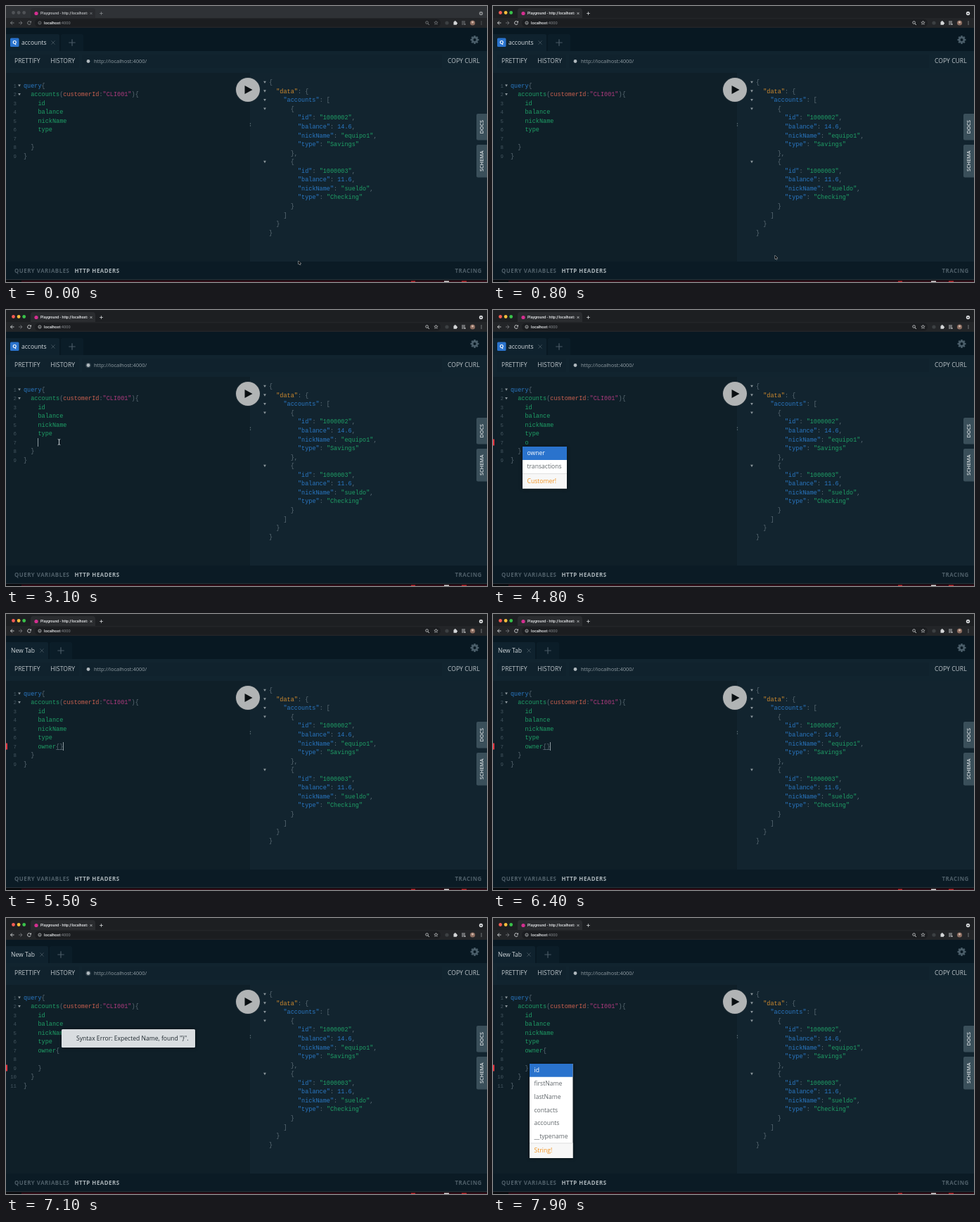
An HTML page with a canvas that plays this animation: 684x392 px, repeating every 8 s.

```html
<!DOCTYPE html>
<html lang="en">
<head>
<meta charset="utf-8">
<title>Query editor</title>
<style>
html, body { margin: 0; width: 100%; height: 100%; overflow: hidden; background: #0b1924; }
canvas { display: block; }
</style>
</head>
<body>
<canvas id="stage" width="684" height="392"></canvas>
<script>
const ctx = document.getElementById('stage').getContext('2d');
const LOOP = 8000;
const UI = '"Open Sans", sans-serif';
const CHROME = 'Roboto, sans-serif';
const MONO = '"Liberation Mono", monospace';
const CODE_SIZE = 8.53, CHAR = CODE_SIZE * 0.6, LINE = 12.5;
const COLOR = {
  key: '#2a78c4', field: '#1f9f66', arg: '#c9604f', str: '#ad3a7d',
  root: '#cb882e', punct: '#5c6c76', dim: '#4f5f69', light: '#bcc4c9',
  blue: '#2a73cd', orange: '#f29422', error: '#e8343f'
};

const T = {
  focus: 500, moveStart: 700, moveEnd: 1500, click: 2100,
  typeO: 4200, list: 4300, accept: 5000, brace: 5300, newTab: 5400, closeBrace: 5400,
  enter: 6600, tip: 6700, tipEnd: 7300, fields: 7500
};

function box(x, y, w, h, fill, radius = 0) {
  ctx.fillStyle = fill;
  ctx.beginPath();
  ctx.roundRect(x, y, w, h, radius);
  ctx.fill();
}

function dot(x, y, r, fill) {
  ctx.fillStyle = fill;
  ctx.beginPath();
  ctx.arc(x, y, r, 0, 7);
  ctx.fill();
}

function stroke(color, width, ...lines) {
  ctx.strokeStyle = color;
  ctx.lineWidth = width;
  ctx.beginPath();
  for (const [x, y, ...rest] of lines) {
    ctx.moveTo(x, y);
    for (let i = 0; i < rest.length; i += 2) ctx.lineTo(rest[i], rest[i + 1]);
  }
  ctx.stroke();
}

function ring(x, y, r, color, width = 0.8) {
  ctx.strokeStyle = color;
  ctx.lineWidth = width;
  ctx.beginPath();
  ctx.arc(x, y, r, 0, 7);
  ctx.stroke();
}

function poly(fill, ...pts) {
  ctx.fillStyle = fill;
  ctx.beginPath();
  for (let i = 0; i < pts.length; i += 2) ctx.lineTo(pts[i], pts[i + 1]);
  ctx.closePath();
  ctx.fill();
}

// y is the vertical middle of the capitals
function text(str, x, y, color, size = 8.6, { family = UI, weight = 400, align = 'left', spacing = 0 } = {}) {
  ctx.font = `${weight} ${size}px ${family}`;
  ctx.letterSpacing = spacing + 'px';
  ctx.textAlign = align;
  ctx.fillStyle = color;
  ctx.fillText(str, x, y + size * 0.34);
}

function cross(x, y, r, color, width = 0.8) {
  stroke(color, width, [x - r, y - r, x + r, y + r], [x - r, y + r, x + r, y - r]);
}

function plus(x, y, r, color, width = 0.9) {
  stroke(color, width, [x - r, y, x + r, y], [x, y - r, x, y + r]);
}

function code(parts, x, y) {
  for (const [str, color] of parts) {
    text(str, x, y, color, CODE_SIZE, { family: MONO });
    x += str.length * CHAR;
  }
}

function fold(x, y) {
  poly('#8b969c', x - 1.9, y - 1.5, x + 1.9, y - 1.5, x, y + 1.8);
}

function browser(active) {
  const icon = active ? '#d5d7d9' : '#85888b';
  const title = active ? '#e8eaec' : '#bcbfc2';
  box(0, 0, 684, 18, active ? '#1d1f22' : '#2f3236');
  box(35, 3, 92, 16, active ? '#2a2c2f' : '#292b2f', [4, 4, 0, 0]);
  box(0, 17, 684, 14, '#232528');
  box(41, 18.5, 577, 11, '#1b1d20', 5.5);
  const lights = active ? ['#f45b53', '#f5bd3c', '#39c34a'] : ['#505357', '#505357', '#505357'];
  lights.forEach((c, i) => dot(10.5 + i * 7.6, 9.5, 2.4, c));
  dot(43, 10.5, 2.6, '#d52f91');
  ctx.save();
  ctx.beginPath();
  ctx.rect(48, 4, 69, 12);
  ctx.clip();
  text('Playground - http://localhost:4000', 49, 10.5, title, 5.2, { family: CHROME, weight: 500 });
  ctx.restore();
  cross(121, 10.5, 1.5, icon, 0.7);
  plus(135.5, 10.5, 2.3, icon, 0.8);

  stroke(icon, 0.9, [11.5, 24, 6.5, 24], [9, 21.5, 6.5, 24, 9, 26.5]);
  stroke('#75787b', 0.9, [18, 24, 23, 24], [20.5, 21.5, 23, 24, 20.5, 26.5]);
  ctx.strokeStyle = icon;
  ctx.lineWidth = 0.9;
  ctx.beginPath();
  ctx.arc(33, 24, 2.4, 0.3, 5.5);
  ctx.stroke();
  poly(icon, 33.6, 23.4, 36, 23.4, 36, 21);
  ring(48, 24, 2.1, icon, 0.7);
  stroke(icon, 0.7, [48, 23.6, 48, 25.2]);
  text('localhost', 54, 24, '#e8eaec', 5.7, { family: CHROME, weight: 500 });
  text(':4000', 54 + ctx.measureText('localhost').width, 24, '#85898d', 5.7, { family: CHROME });

  ring(598.6, 23.5, 1.8, icon);
  stroke(icon, 0.9, [600, 25, 602, 27]);
  const star = [];
  for (let i = 0; i < 11; i++) {
    const r = i % 2 ? 1.2 : 2.8, a = i * Math.PI / 5 - Math.PI / 2;
    star.push(611.5 + r * Math.cos(a), 24 + r * Math.sin(a));
  }
  stroke(icon, 0.6, star);
  dot(627, 24, 2.6, '#3c4043');
  const puzzle = '#d5d7d9';
  box(636.5, 22.3, 4.5, 4.5, puzzle, 0.6);
  dot(638.7, 22, 1.1, puzzle);
  dot(641, 24.5, 1.1, puzzle);
  stroke(icon, 0.8, [648, 22, 653, 22], [648, 24, 653, 24], [648, 26, 651, 26]);
  dot(652.5, 26, 1, icon);
  dot(663.5, 24, 3.6, '#8a6c60');
  dot(663.5, 23, 1.5, '#d4b8a8');
  [-2, 0, 2].forEach(d => dot(676, 24 + d, 0.6, icon));
  dot(675.5, 10.5, 2.7, icon);
  poly('#202224', 674.2, 10, 676.8, 10, 675.5, 11.7);
}

function gear(x, y) {
  const color = '#4a5d69';
  for (let i = 0; i < 8; i++) {
    const a = i * Math.PI / 4, c = Math.cos(a), s = Math.sin(a);
    stroke(color, 2.4, [x + 3 * c, y + 3 * s, x + 6 * c, y + 6 * s]);
  }
  dot(x, y, 4.7, color);
  dot(x, y, 2, '#081822');
}

function tabs(renamed) {
  const width = renamed ? 60 : 76;
  box(0, 31, 684, 33, '#081822');
  box(0, 40, width, 24, '#0f222e', [0, 2, 0, 0]);
  box(width + 2, 40, 32, 24, '#0b1d28', [2, 2, 0, 0]);
  if (renamed) {
    text('New Tab', 7, 52, '#cdd4d8', 8.55);
  } else {
    box(6, 45.5, 12.5, 12.5, COLOR.blue, 1.5);
    text('Q', 12.2, 51.7, '#fff', 7.5, { weight: 700, align: 'center' });
    text('accounts', 22, 52, '#d3d9dd', 8.55);
  }
  cross(width - 9, 52, 2.6, '#485963');
  plus(width + 18, 52, 4.7, '#4a5b66', 1.2);
  gear(666.5, 48);
}

function toolbar(t) {
  box(0, 64, 684, 31, '#11242f');
  box(6, 69, 98, 19, '#10222d', 1);
  box(108, 69, 512, 19, '#10222d', 1);
  const style = { weight: 500 };
  text('PRETTIFY', 12, 78.5, COLOR.light, 8.6, style);
  text('HISTORY', 63.3, 78.5, COLOR.light, 8.6, style);
  text('COPY CURL', 628, 78.5, COLOR.light, 8.6, style);
  const pulse = (t % 2000 - 900) / 400;
  if (pulse >= 0 && pulse < 1) dot(117, 78.5, 2.6 + pulse * 2.4, `rgba(190,200,206,${0.4 * (1 - pulse)})`);
  dot(117, 78.5, 2.4, '#b0b9be');
  text('http://localhost:4000/', 125, 78.5, '#919da4', 7.5);
}

function editorLines(t) {
  const p = COLOR.punct, f = COLOR.field;
  const lines = [
    [0, [['query', COLOR.key], ['{', p]]],
    [2, [['accounts', f], ['(', p], ['customerId', COLOR.arg], [':', p], ['"CLI001"', COLOR.str], ['){', p]]],
    ...['id', 'balance', 'nickName', 'type'].map(s => [4, [[s, f]]])
  ];
  if (t >= T.enter) {
    lines.push([4, [['owner', f], ['{', p]]], [0, []], [4, [['}', p]]]);
  } else {
    const typed = t < T.typeO ? '' : t < T.accept ? 'o' : 'owner';
    const braces = t < T.brace ? '' : t < T.closeBrace ? '{' : '{}';
    lines.push([4, [[typed, f], [braces, p]]]);
  }
  lines.push([2, [['}', p]]], [0, [['}', p]]]);
  return lines;
}

function editor(t) {
  box(0, 95, 348, 268, '#0e1e28');
  box(6, 95, 341, 268, '#0f1f28', 2);
  editorLines(t).forEach(([indent, parts], i) => {
    const y = 113 + i * LINE;
    text(String(i + 1), 15, y, '#44555f', 7.4, { family: MONO, align: 'right' });
    code(parts, 25 + indent * CHAR, y);
  });
  fold(19, 113);
  fold(19, 125.5);
  if (t >= T.closeBrace && t < T.enter) {
    const braceX = 25 + 9 * CHAR;
    stroke(COLOR.punct, 0.7, [braceX, 192.5, braceX + 2 * CHAR, 192.5]);
  }
  if (t >= T.typeO) box(0, t < T.enter ? 183.5 : 208.5, 2, 9, COLOR.error);
  caret(t);
}

function caret(t) {
  if (t < T.click || t >= T.tipEnd) return;
  const stops = [
    [T.click, 4], [T.typeO, 5], [T.accept, 9], [T.brace, 10], [T.closeBrace, 11], [T.enter, 6]
  ];
  const [since, column] = stops.filter(([start]) => start <= t).pop();
  if ((t - since) % 1000 >= 500) return;
  const y = t < T.enter ? 188 : 200.5;
  box(Math.round(25 + column * CHAR), y - 6, 0.9, 12, '#9ba7ad');
}

function account(id, balance, nick, type) {
  const pair = (key, value, color, end = ',') =>
    [8, [[`"${key}"`, COLOR.key], [': ', COLOR.punct], [value, color], [end, COLOR.punct]]];
  return [
    [6, [['{', COLOR.punct]]],
    pair('id', `"${id}"`, COLOR.field),
    pair('balance', balance, COLOR.key),
    pair('nickName', `"${nick}"`, COLOR.field),
    pair('type', `"${type}"`, COLOR.field, '')
  ];
}

function result() {
  const p = COLOR.punct;
  box(347, 95, 337, 268, '#12242f');
  const lines = [
    [0, [['{', p]]],
    [2, [['"data"', COLOR.root], [': {', p]]],
    [4, [['"accounts"', COLOR.key], [': [', p]]],
    ...account('1000002', '14.6', 'equipo1', 'Savings'),
    [6, [['},', p]]],
    ...account('1000003', '11.6', 'sueldo', 'Checking'),
    [6, [['}', p]]], [4, [[']', p]]], [2, [['}', p]]], [0, [['}', p]]]
  ];
  lines.forEach(([indent, parts], i) => {
    const y = 108.3 + i * 12.56;
    code(parts, 374 + indent * CHAR, y);
    if (i < 4 || i === 9) fold(368, y);
  });
  [167, 170].forEach(y => dot(347.5, y, 0.7, '#6b7b85'));
}

function sideButton(label, y, h) {
  box(669, y, 15, h, '#3a4f5a', [2, 0, 0, 2]);
  ctx.save();
  ctx.translate(677, y + h / 2);
  ctx.rotate(-Math.PI / 2);
  text(label, 0, 0, '#d5dbde', 7.3, { weight: 600, align: 'center' });
  ctx.restore();
}

function playButton() {
  dot(344, 119, 18, '#1b2a33');
  dot(344, 119, 17, '#b1b4b5');
  poly('#0a0f12', 339.5, 113, 350.5, 119, 339.5, 125);
}

function footer() {
  const style = { weight: 700, spacing: 0.5 };
  box(0, 363, 684, 26, '#0b1b25');
  text('QUERY VARIABLES', 12, 376, COLOR.dim, 7.9, style);
  text('HTTP HEADERS', 97.5, 376, '#a9b3b8', 7.9, style);
  text('TRACING', 638.5, 376, COLOR.dim, 7.9, style);
  box(0, 388, 684, 4, '#0a0b0e');
  box(0, 388, 684, 0.7, '#33404a');
  box(22, 390, 662, 2, '#310d17');
  box(576, 390.5, 6, 1.5, '#b82c31');
  box(623, 390.5, 7, 1.5, '#d5d5d5');
  box(648, 390.5, 7, 1.5, '#b82c31');
}

function popup(x, y, w, items, type, row) {
  const h = items.length * row;
  ctx.save();
  ctx.shadowColor = 'rgba(0,0,0,.45)';
  ctx.shadowBlur = 5;
  box(x, y, w, h + 21.5, '#fff');
  ctx.restore();
  box(x, y, w, row, COLOR.blue);
  items.forEach((item, i) => text(item, x + 6.5, y + (i + 0.5) * row, i ? '#62686c' : '#fff'));
  box(x, y + h, w, 21.5, '#f7f7f7');
  box(x, y + h, w, 0.7, '#d8d8d8');
  text(type, x + 6.5, y + h + 11, COLOR.orange);
}

function tooltip() {
  ctx.save();
  ctx.shadowColor = 'rgba(0,0,0,.5)';
  ctx.shadowBlur = 5;
  box(79, 158, 190, 26, '#d9dde0', 1.5);
  ctx.restore();
  text('Syntax Error: Expected Name, found "}".', 100, 171, '#202a30');
}

function pointer(t) {
  if (t >= T.typeO) return;
  const k = Math.min(1, Math.max(0, (t - T.moveStart) / (T.moveEnd - T.moveStart)));
  const e = k * k * (3 - 2 * k);
  const x = 416 + (75.5 - 416) * e, y = 362 + (187.5 - 362) * e;
  if (x < 347 && y < 363) {
    stroke('#d9dee1', 0.9, [x, y - 3.5, x, y + 3.5],
      [x - 1.7, y - 4, x, y - 3.3, x + 1.7, y - 4], [x - 1.7, y + 4, x, y + 3.3, x + 1.7, y + 4]);
    return;
  }
  const arrow = [0, 0, 0, 5, 1.2, 4, 2, 5.8, 2.9, 5.4, 2.1, 3.7, 3.6, 3.6].map((v, i) => v + (i % 2 ? y : x));
  stroke('#c9ced1', 1, [...arrow, x, y]);
  poly('#0a0c0e', ...arrow);
}

function draw(t) {
  browser(t >= T.focus);
  tabs(t >= T.newTab);
  toolbar(t);
  editor(t);
  result();
  playButton();
  sideButton('DOCS', 153, 37.5);
  sideButton('SCHEMA', 197, 46.5);
  footer();
  if (t >= T.list && t < T.accept) popup(42, 194, 63, ['owner', 'transactions'], 'Customer!', 19);
  if (t >= T.tip && t < T.tipEnd) tooltip();
  if (t >= T.fields) {
    popup(52, 207, 61.5, ['id', 'firstName', 'lastName', 'contacts', 'accounts', '__typename'], 'String!', 18.75);
  }
  pointer(t);
}

const start = performance.now();
function frame() {
  draw((performance.now() - start) % LOOP);
  requestAnimationFrame(frame);
}
frame();
</script>
</body>
</html>
```
